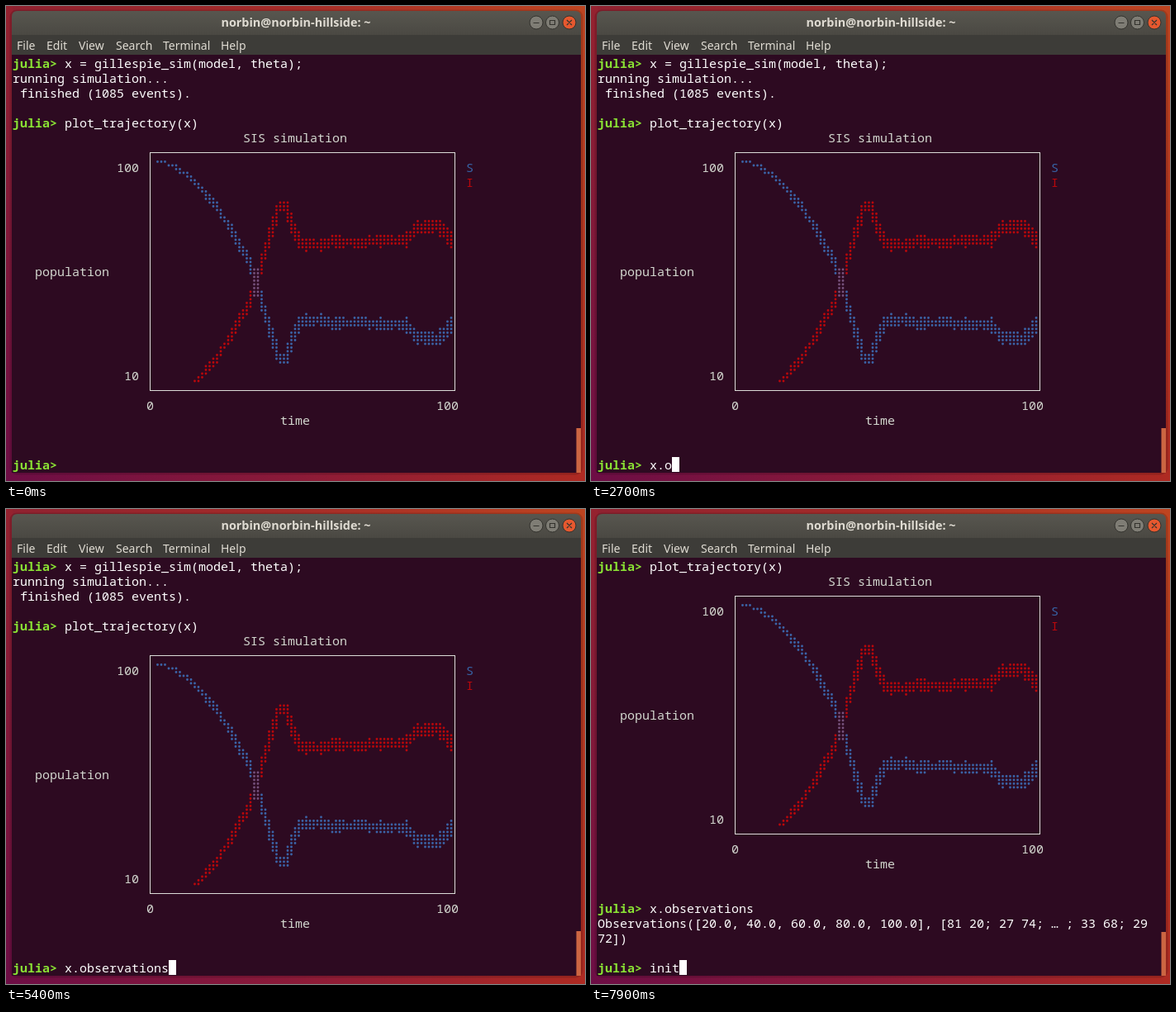
An HTML page for the animation above (8000 ms loop, 701 px wide and 575 px high).

```html
<!DOCTYPE html>
<html lang="en">
<head>
<meta charset="utf-8">
<title>Terminal session</title>
<style>
  html, body { margin: 0; width: 100%; height: 100%; overflow: hidden; }
  svg { display: block; }
  text { white-space: pre; }
  .mono { font: 15px "Noto Sans Mono", "DejaVu Sans Mono", monospace; fill: #fff; }
  .prompt { font-weight: 700; fill: #8ae234; }
  .dim { fill: #d3d7cf; }
  .blue { fill: #3763a5; stroke: #3b63a6; }
  .red { fill: #b9070b; stroke: #b9070b; }
  .both { stroke: #75507b; }
  text.blue, text.red { stroke: none; }
  path.dots { stroke-width: 2.9; stroke-linecap: round; }
  .menu { font: 14px "Noto Sans", "Open Sans", sans-serif; fill: #dfdbd2; }
  .title { font: 700 14.4px "Noto Sans", "Open Sans", sans-serif; fill: #dfdbd2; text-anchor: middle; }
</style>
</head>
<body>
<svg width="701" height="575" viewBox="0 0 701 575">
  <defs>
    <linearGradient id="top"><stop stop-color="#8f2130"/><stop offset=".5" stop-color="#a52c28"/><stop offset="1" stop-color="#bd4420"/></linearGradient>
    <linearGradient id="bottom"><stop stop-color="#6d0d45"/><stop offset=".5" stop-color="#8b1a38"/><stop offset="1" stop-color="#ae2a22"/></linearGradient>
    <linearGradient id="left" x2="0" y2="1"><stop stop-color="#95222f"/><stop offset="1" stop-color="#6d0d45"/></linearGradient>
    <linearGradient id="right" x2="0" y2="1"><stop stop-color="#bd4420"/><stop offset="1" stop-color="#ae2a22"/></linearGradient>
    <linearGradient id="bar" x2="0" y2="1"><stop stop-color="#58564f"/><stop offset="1" stop-color="#3e3d38"/></linearGradient>
  </defs>
  <rect width="701" height="288" fill="url(#top)"/>
  <rect y="287" width="701" height="288" fill="url(#bottom)"/>
  <rect width="8" height="575" fill="url(#left)"/>
  <rect x="693" width="8" height="575" fill="url(#right)"/>
  <rect x="6" y="6" width="691" height="560" rx="7" fill="none" stroke="#000" stroke-width="3" opacity=".15"/>
  <path d="M7 60V13Q7 6 14 6H689Q696 6 696 13V60Z" fill="url(#bar)"/>
  <rect x="7" y="35" width="689" height="24" fill="#3d3c38"/>
  <rect x="7" y="59" width="689" height="506" fill="#2d0a21"/>
  <text class="title" x="351" y="25">norbin@norbin-hillside: ~</text>
  <g class="menu">
    <text x="13" y="53">File</text>
    <text x="49" y="53">Edit</text>
    <text x="88" y="53">View</text>
    <text x="133" y="53">Search</text>
    <text x="190" y="53">Terminal</text>
    <text x="260" y="53">Help</text>
  </g>
  <g stroke="#34332e">
    <circle cx="642" cy="20" r="8" fill="#7f7d75"/>
    <circle cx="661.5" cy="20" r="8" fill="#7f7d75"/>
    <circle cx="682" cy="20" r="8" fill="#e6582f"/>
    <path d="M638.5 20.5h7M658.5 17.5h6v5h-6zM679 17l6 6m0-6l-6 6" fill="none" stroke-width="1.2"/>
  </g>
  <svg x="0" y="59" width="701" height="506" viewBox="0 59 701 506">
    <g id="screen" class="mono">
      <rect x="174.5" y="177.5" width="369" height="288" fill="none" stroke="#dcdcd8"/>
    </g>
    <rect id="cursor" y="546" width="9" height="18" fill="#fff"/>
    <rect id="thumb" x="690.5" width="5.5" height="54" fill="#cc6542"/>
  </svg>
</svg>
<script>
const $ = id => document.getElementById(id);
const screen = $('screen'), cursor = $('cursor'), thumb = $('thumb');
const CELL = 9, LINE = 18, LEFT = 8, TOP = 60, INPUT = 7;

function add(tag, attrs, text = '') {
  const el = document.createElementNS('http://www.w3.org/2000/svg', tag);
  for (const key in attrs) el.setAttribute(key, attrs[key]);
  el.textContent = text;
  return screen.appendChild(el);
}
const write = (row, col, text, cls = '') => add('text',
  { x: LEFT + col * CELL, y: TOP + row * LINE + 15, class: cls }, text);
function prompt(row, text) {
  write(row, 0, 'julia>', 'prompt');
  return write(row, INPUT, text);
}

prompt(0, 'x = gillespie_sim(model, theta);');
write(1, 0, 'running simulation...');
write(2, 0, ' finished (1085 events).');
prompt(4, 'plot_trajectory(x)');
write(5, 31, 'SIS simulation', 'dim');
write(7, 14, '100', 'dim');
write(14, 3, 'population', 'dim');
write(21, 15, '10', 'dim');
write(23, 18, '0', 'dim');
write(23, 57, '100', 'dim');
write(24, 36, 'time', 'dim');
write(7, 61, 'S', 'blue');
write(8, 61, 'I', 'red');
write(28, 0, 'Observations([20.0, 40.0, 60.0, 80.0, 100.0], [81 20; 27 74; … ; 33 68; 29');
write(29, 0, '72])');

// Susceptible level as column and dot row; the infected level mirrors it.
const level = [[0, 0], [4, 1], [10, 5], [16, 12], [20, 18], [25, 27], [28, 36], [33, 53],
  [35, 53], [39, 43], [53, 43.5], [67, 44], [71, 48], [76, 48], [80, 43.5]];
const COLS = 80, ROWS = 60, MIRROR = 65;

function levelAt(c) {
  const i = level.findIndex(p => p[0] > c);
  if (i < 0) return level.at(-1)[1];
  const [[c0, r0], [c1, r1]] = [level[i - 1], level[i]];
  return r0 + (r1 - r0) * (c - c0) / (c1 - c0);
}

let seed = 7;
const random = () => (seed = seed * 16807 % 2147483647) / 2147483647;

// Each braille cell has one colour: 1 blue, 2 red, 3 both.
const dots = new Map(), cells = {};
const cellOf = (c, r) => (c >> 1) + ',' + (r >> 2);
function plot(c, r, bit) {
  if (r < 0 || r >= ROWS) return;
  dots.set(c + ',' + r, [c, r]);
  cells[cellOf(c, r)] |= bit;
}
for (let c = 0; c < COLS; c++) {
  const ends = [levelAt(c), levelAt(c + 1)];
  const spread = Math.min(1.4, c / 30);
  const top = Math.round(Math.min(...ends) - spread * (0.4 + random()));
  const bottom = Math.round(Math.max(...ends) + spread * (0.4 + random()) - 0.5);
  for (let r = top; r <= Math.max(top, bottom); r++) {
    plot(c, r, 1);
    plot(c, MIRROR - r, 2);
  }
}
const paths = ['', '', '', ''];
for (const [c, r] of dots.values())
  paths[cells[cellOf(c, r)]] += `M${183.5 + c * 4.5} ${188.5 + r * 4.5}h0`;
['blue', 'red', 'both'].forEach((cls, i) => add('path', { d: paths[i + 1], class: 'dots ' + cls }));

// Moments that restart the cursor blink, with the characters typed so far.
const first = 'x.observations', second = 'init';
const ENTER = 5400, OUTPUT = 5500, LOOP = 8000, BLINK = 600;
const keys = [[-900, 0], [2000, 1], [2500, 2], [2700, 3], [2900, 4], [3000, 5], [3500, 6],
  [3800, 7], [4000, 8], [4200, 9], [4300, 11], [4600, first.length], [ENTER, first.length],
  [OUTPUT, 0], [5900, 0], [6600, 0], [7600, 1], [7700, 2], [7900, second.length]];
const firstLine = prompt(27, ''), secondLine = prompt(31, '');

function draw() {
  const t = performance.now() % LOOP;
  const [since, typed] = keys.findLast(k => k[0] <= t);
  const done = t >= OUTPUT;
  const lit = Math.floor((t - since) / BLINK) % 2 === 0;
  screen.setAttribute('transform', `translate(0 ${done ? -4 * LINE : 0})`);
  firstLine.textContent = done ? first : first.slice(0, typed);
  secondLine.textContent = done ? second.slice(0, typed) : '';
  cursor.setAttribute('x', LEFT + (INPUT + typed) * CELL);
  cursor.setAttribute('visibility', lit ? 'visible' : 'hidden');
  thumb.setAttribute('y', done ? 512 : 511);
  requestAnimationFrame(draw);
}
draw();
</script>
</body>
</html>
```
